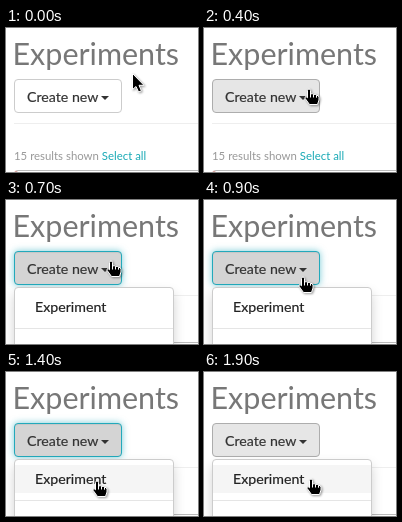
An HTML page that plays this animation: 192x144 px, repeating every 2000 ms.

```html
<!DOCTYPE html>
<html lang="en">
<head>
<meta charset="utf-8">
<title>Create new menu</title>
<style>
  html, body { margin: 0; width: 100%; height: 100%; overflow: hidden; background: #fff; }
  body { position: relative; font: 14.2px Lato, sans-serif; color: #333; }
  body * { position: absolute; box-sizing: border-box; white-space: nowrap; }
  h1 { margin: 0; left: 6.5px; top: 10px; font-size: 30.5px; font-weight: 400; line-height: 31px; color: #777; }
  #rule { left: 8px; top: 95px; width: 184px; height: 1px; background: #eee; }
  #summary { left: 8px; top: 118px; font-size: 11.4px; line-height: 20px; color: #999; }
  #summary span { position: static; color: #18a9b5; }
  #panel { left: 8px; top: 142px; width: 200px; height: 20px; border: 1px solid #bbb; border-left: 3px solid #d9a5a0; border-radius: 4px; }
  #button { left: 8px; top: 51px; width: 108px; height: 34px; padding-left: 12px; line-height: 34px;
    border: 1px solid #ccc; border-radius: 4px; background: #fff; }
  #button, #item { -webkit-text-stroke: .2px; }
  #button.active { background: #e6e6e6; border-color: #adadad; }
  #button.focus { background: #d4d4d4; border-color: #22a9bb; box-shadow: inset 0 1px 1px #0001, 0 0 7px #22a9bb99; }
  #caret { left: 86px; top: 16px; border: 4px solid transparent; border-top-color: #333; border-bottom: 0; }
  #menu { left: 8px; top: 87px; width: 160px; height: 90px; border: 1px solid #ccc; border-radius: 4px;
    background: #fff; box-shadow: 0 6px 12px #0000002d; }
  #item { left: 0; top: 5px; width: 158px; height: 28px; padding-left: 20px; line-height: 28px; color: #222; }
  #item.hover { background: #f5f5f5; }
  #divider { left: 0; top: 40px; width: 158px; height: 1px; background: #e5e5e5; }
  svg { left: 0; top: 0; width: 192px; height: 144px; filter: drop-shadow(1px 1px 1px #0006); }
</style>
</head>
<body>
<h1>Experiments</h1>
<div id="rule"></div>
<div id="summary">15 results shown <span>Select all</span></div>
<div id="panel"></div>
<div id="button">Create new<i id="caret"></i></div>
<div id="menu"><div id="item">Experiment</div><div id="divider"></div></div>
<svg viewBox="0 0 192 144" stroke="#fff" stroke-linejoin="round">
  <path id="arrow" d="M.5 .5V16.5L4 13.5 6.6 19 9.4 17.8 7 12.3H12Z"/>
  <g id="hand">
    <path d="M-1.5 1.5Q-1.5 0 0 0T1.5 1.5V5Q3.5 4 4.5 5.5 6.5 4.7 7.5 6.3 10 6 10 8.5V11L8.5 15.5H.5L-3.8 9.5Q-4.5 7.5-3 7.5L-1.5 8.8Z"/>
    <path d="M1.5 5V8.5M4.5 5.5V8.5M7.5 6.3V8.7"/>
  </g>
</svg>
<script>
  const LOOP = 2000, STEP = 100;
  // Pointer tip: [time, x, y]
  const path = [[0, 126, 45], [300, 105, 61], [700, 105, 61], [1100, 92, 93], [1400, 91, 109], [1800, 107, 107], [LOOP, 107, 107]];
  const $ = id => document.getElementById(id);

  function pointerAt(t) {
    const next = path.findIndex(key => key[0] > t);
    const [t0, x0, y0] = path[next - 1], [t1, x1, y1] = path[next];
    const k = (t - t0) / (t1 - t0);
    return [x0 + (x1 - x0) * k, y0 + (y1 - y0) * k];
  }

  function draw(now) {
    const t = Math.floor(now % LOOP / STEP) * STEP;
    const [x, y] = pointerAt(t);
    const open = t >= 500;
    const overButton = x > 8 && x < 116 && y > 51 && y < 85;
    const overItem = open && y > 94 && y < 121;
    const toggle = (id, name, on) => $(id).classList.toggle(name, on);

    toggle('button', 'active', overButton || open);
    toggle('button', 'focus', open && t < 1900);
    toggle('item', 'hover', overItem);
    $('menu').style.display = open ? 'block' : 'none';

    const showHand = overButton || open;
    for (const [id, on] of [['hand', showHand], ['arrow', !showHand]]) {
      $(id).style.display = on ? 'inline' : 'none';
      $(id).setAttribute('transform', `translate(${Math.round(x)} ${Math.round(y)})`);
    }
  }

  function tick() {
    draw(performance.now());
    requestAnimationFrame(tick);
  }
  tick();
</script>
</body>
</html>
```
